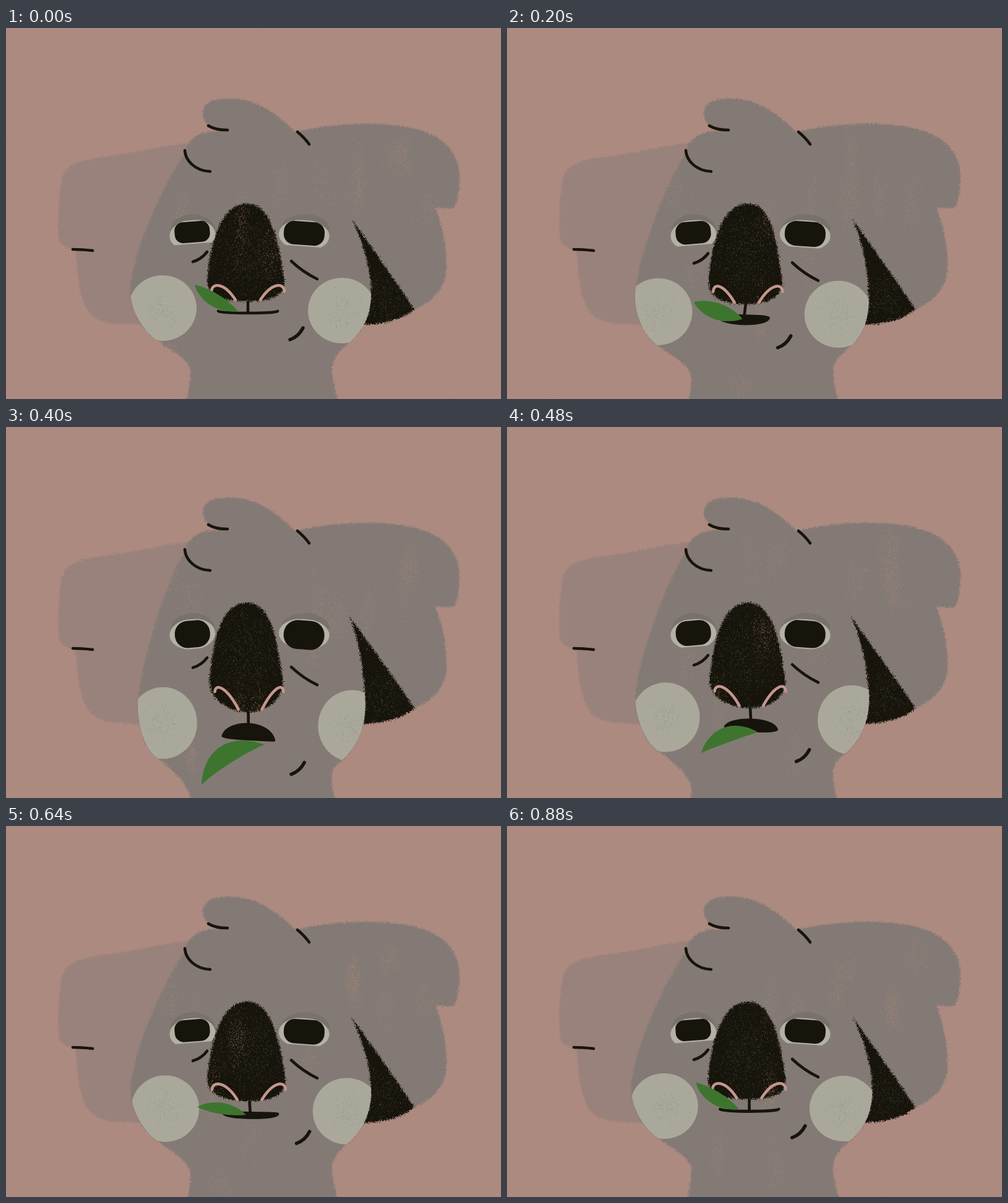
An HTML page with a canvas for the animation above (920 ms loop, 800 px wide and 600 px high).

```html
<!DOCTYPE html>
<html lang="en">
<head>
<meta charset="utf-8">
<title>Chewing koala</title>
<style>
html, body { margin: 0; width: 100%; height: 100%; overflow: hidden; background: #ad8a80; }
canvas { display: block; width: 800px; height: 600px; }
</style>
</head>
<body>
<canvas id="stage" width="800" height="600"></canvas>
<script>
const W = 800, H = 600, LOOP = 920, STEP = 40;
const ctx = document.getElementById('stage').getContext('2d', { willReadFrequently: true });

const COLOR = {
  back: '#ad8a80', farEar: '#99827b', fur: '#837a75', lid: '#79716c', ink: '#17140b',
  cheek: '#aaa89b', eye: '#b2b1a4', leaf: '#3d752f', pink: '#c4968d'
};

const progress = (t, from, to) => Math.min(1, Math.max(0, (t - from) / (to - from)));
const smooth = u => u * u * (3 - 2 * u);

// The jaw drops quickly and rises slowly.
const jawDrop = t => t < 320 ? smooth(progress(t, 160, 320)) : (1 - progress(t, 320, 800)) ** 2;

// The jaw swings far to the left, then a little to the right.
const jawSway = t => t < 390
  ? -29 * Math.sin(Math.PI * progress(t, 0, 390) ** 2)
  : 11 * Math.sin(Math.PI * progress(t, 390, LOOP) ** 0.7);

// The leaf bends while it is being lifted.
const leafCurl = t => 30 * smooth(progress(t, 320, 400)) * (1 - progress(t, 320, 880));

function random(seed) {
  return () => {
    seed = (seed + 0x6D2B79F5) | 0;
    let x = Math.imul(seed ^ (seed >>> 15), seed | 1);
    x ^= x + Math.imul(x ^ (x >>> 7), x | 61);
    return ((x ^ (x >>> 14)) >>> 0) / 4294967296;
  };
}

function fill(path, color) {
  ctx.fillStyle = color;
  ctx.fill(path);
}

function stroke(d, width = 4.6, color = COLOR.ink) {
  ctx.strokeStyle = color;
  ctx.lineWidth = width;
  ctx.lineCap = ctx.lineJoin = 'round';
  ctx.stroke(new Path2D(d));
}

function clipped(path, draw) {
  ctx.save();
  ctx.clip(path);
  draw();
  ctx.restore();
}

function ellipse(cx, cy, rx, ry, color, from = 0, to = 2 * Math.PI) {
  ctx.beginPath();
  ctx.ellipse(cx, cy, rx, ry, 0, from, to);
  ctx.fillStyle = color;
  ctx.fill();
}

const farEar = new Path2D('M300 186C270 186 225 199 175 206C120 213 94 218 89 250C84 285 84 310 85 338' +
  'C86 352 96 356 112 360C116 385 114 425 131 455C145 478 170 480 225 480L330 400Z');
const nearEar = new Path2D('M460 170C520 154 600 150 652 161C705 171 733 200 733 242C732 270 729 285 723 291' +
  'Q710 293 694 290C705 320 713 350 712 390C710 425 685 445 656 457L520 440Z');
const tuft = new Path2D('M328 158C312 145 314 117 346 115C400 108 436 138 466 166L494 197L400 250L320 200' +
  'L345 167Z');

function facePath(drop, sway) {
  const lx = 201 + 18 * drop - 0.15 * sway, rx = 590 - 14 * drop + 0.15 * sway;
  const wideY = 422 + 33 * drop - 0.2 * sway;
  const jawY = 506 + 43 * drop - 0.1 * sway, jawR = 558 - 16 * drop;
  const neckL = 557 + 65 * drop, neckR = 553 + 28 * drop;
  const [tx, ty] = shadeTip(drop);
  return new Path2D(`M345 167C312 164 291 182 288 205C262 240 ${lx + 6} ${wideY - 70} ${lx} ${wideY}
    C${lx - 1} ${wideY + 35} 223 ${jawY - 15} 245 ${jawY}
    C265 ${jawY + 15} 298 ${neckL - 22} 298 ${neckL}
    Q298 ${neckL + 15} 292 ${neckL + 45}V650H536V${neckR + 47}
    Q527 ${neckR + 15} 527 ${neckR}
    C527 ${neckR - 14} ${jawR - 25} ${jawY + 20} ${jawR} ${jawY}
    C${jawR + 18} ${jawY - 18} ${rx + 1} ${wideY + 45} ${rx} ${wideY}
    C${rx - 1} ${wideY - 35} ${tx + 18} ${ty + 38} ${tx} ${ty}
    C${tx - 15} ${ty - 50} 505 205 490 188L400 150Z`);
}

const shadeTip = drop => [559 - 7 * drop, 309 - 5 * drop];

function earShade(drop) {
  const [x, y] = shadeTip(drop);
  return new Path2D(`M${x} ${y}C600 368 636 418 660 455C640 472 610 479 577 480L550 470Z`);
}

function nosePath(drop, sway) {
  const l = 325 + 6 * drop, r = 450 - 4 * drop + 0.2 * sway, y = 408 + 3 * drop;
  const bx = 390 + 0.25 * sway, by = 442 + 28 * drop;
  return new Path2D(`M${l} ${y}C${l + 5} 350 346 284 390 284C430 284 ${r - 9} 350 ${r} ${y}
    C${r + 2} ${y + 30} ${bx + 30} ${by} ${bx} ${by}C${bx - 30} ${by} ${l - 2} ${y + 30} ${l} ${y}Z`);
}

// Chalky edges: every pixel is fetched from a slightly shifted place.
const shifts = (() => {
  const rnd = random(5), spread = () => Math.round((rnd() + rnd() + rnd() - 1.5) * 2.4);
  return Int32Array.from({ length: 99991 }, () => spread() + W * spread());
})();

function roughen(frame) {
  const image = ctx.getImageData(0, 0, W, H);
  const out = new Uint32Array(image.data.buffer), src = out.slice();
  let k = frame * 7919 % shifts.length;
  for (let i = 0; i < out.length; i++) {
    const j = i + shifts[k];
    if (j >= 0 && j < src.length) out[i] = src[j];
    if (++k === shifts.length) k = 0;
  }
  ctx.putImageData(image, 0, 0);
}

// Soft cloud of single grains.
function grains(rnd, count, cx, cy, sx, sy, color) {
  const bell = () => rnd() + rnd() + rnd() - 1.5;
  ctx.fillStyle = color;
  for (let i = 0; i < count; i++) {
    ctx.fillRect(Math.round(cx + bell() * sx), Math.round(cy + bell() * sy), 1, 1 + Math.round(rnd()));
  }
}

function texture(rnd, face, nose, shade) {
  const patches = (path, n, x, y, w, h) => clipped(path, () => {
    for (let i = 0; i < n; i++) {
      grains(rnd, 260, x + rnd() * w, y + rnd() * h, 10 + rnd() * 18, 30 + rnd() * 40,
        'rgba(178,141,118,.3)');
    }
  });
  patches(nearEar, 5, 520, 180, 160, 140);
  patches(face, 7, 260, 190, 260, 390);
  const dust = 'rgba(122,117,102,.24)';
  clipped(nose, () => grains(rnd, 1300, 388, 365, 65, 85, dust));
  clipped(shade, () => grains(rnd, 500, 612, 435, 45, 50, dust));
  ctx.fillStyle = 'rgba(70,50,45,.3)';
  for (let i = 0; i < 50; i++) ctx.fillRect(rnd() * W | 0, rnd() * H | 0, 1, 1);
}

function eye(cx, tilt, rx, w, h) {
  const cy = 331;
  ellipse(cx + 1, cy - 4, rx - 1, 26, COLOR.lid, Math.PI, 2 * Math.PI);
  ctx.save();
  ctx.translate(cx, cy);
  ctx.rotate(tilt);
  const opening = new Path2D();
  opening.rect(-50, -20, 100, h + 4);
  ctx.clip(opening);
  ellipse(0, 4, rx, 25, COLOR.eye);
  const pupil = new Path2D();
  pupil.roundRect(-w / 2, -18, w, h, Math.min(h / 2, h * 0.7 - 10));
  fill(pupil, COLOR.ink);
  ctx.restore();
}

function nostril(x, y, ex, ey) {
  const side = Math.sign(ex - x);
  const archY = y + (ey - y) * 0.55 - 22;
  stroke(`M${x} ${y}C${x + side} ${y - 15} ${ex - 18 * side} ${archY} ${ex} ${ey}`, 4.6, COLOR.pink);
}

function muzzle(drop, sway) {
  const shift = 0.2 * sway, outerY = 426 + 3 * drop, innerY = 440 + 24 * drop;
  nostril(332 + 8 * drop, outerY, 371 + shift + 6 * drop, innerY);
  nostril(450 + shift - 3 * drop, outerY, 411 + shift + 3 * drop, innerY);
  stroke(`M${391 + 0.25 * sway} ${443 + 27 * drop}L${391 + 0.35 * sway} ${460 + 30 * drop}`);
}

function mouth(drop, sway) {
  const cx = 391 + 0.4 * sway, half = 48 - 9 * drop - 0.3 * Math.abs(sway);
  const xl = cx - half, xr = cx + half, inset = half * 0.2;
  const yl = 458 + 60 * drop, yr = 458 + 70 * drop;
  const pull = y => y + (y - (yl + yr) / 2) / 3;
  const top = pull(461 + 29 * drop), bottom = pull(461 + 62 * drop + 0.35 * Math.abs(sway));
  const d = `M${xl} ${yl}C${xl + inset} ${top} ${xr - inset} ${top} ${xr} ${yr}
    C${xr - inset / 2} ${bottom} ${xl + inset} ${bottom} ${xl} ${yl}Z`;
  if (drop > 0.85) ellipse(xr - 9, yr + 8, 13, 9, COLOR.cheek);
  fill(new Path2D(d), COLOR.ink);
  stroke(d);
}

function leaf(drop, sway, curl) {
  const x = 305 + 15 * drop + 0.25 * sway, y = 415 + 180 * drop + 1.5 * curl;
  const dx = 375 + 35 * drop + 0.7 * curl - x, dy = 458 + 80 * drop - y;
  const length = Math.hypot(dx, dy);
  const upper = -(8 + 45 * drop + 0.3 * curl), lower = 20 - curl;
  // a point along the midrib, moved sideways from it
  const at = (u, off) => `${x + dx * u - dy / length * off} ${y + dy * u + dx / length * off}`;
  fill(new Path2D(`M${x} ${y}C${at(0.28, upper)} ${at(0.7, upper)} ${at(1, 0)}
    C${at(0.7, lower)} ${at(0.25, lower)} ${x} ${y}Z`), COLOR.leaf);
}

function cheek(cx, cy, drop, rnd) {
  const ry = 53 + 7 * drop;
  ellipse(cx, cy, 55, ry, COLOR.cheek);
  grains(rnd, 220, cx, cy, 32, ry * 0.6, 'rgba(125,122,108,.25)');
}

function draw(t) {
  const drop = jawDrop(t), sway = jawSway(t), tug = 16 * drop;
  const frame = t / STEP, rnd = random(frame * 101 + 17);
  const face = facePath(drop, sway), nose = nosePath(drop, sway), shade = earShade(drop);

  ctx.fillStyle = COLOR.back;
  ctx.fillRect(0, 0, W, H);
  fill(farEar, COLOR.farEar);
  fill(nearEar, COLOR.fur);
  fill(shade, COLOR.ink);
  fill(face, COLOR.fur);
  fill(tuft, COLOR.fur);
  fill(nose, COLOR.ink);
  roughen(frame);
  texture(rnd, face, nose, shade);

  clipped(face, () => {
    cheek(253 + 0.4 * sway, 453 + 37 * drop, drop, rnd);
    cheek(543 + 0.5 * sway + 22 * drop, 457 + 38 * drop, drop, rnd);
  });
  eye(301, -0.08, 37, 57, 34 + 0.88 * tug);
  eye(482, 0.07, 41, 66, 38 + 0.8 * tug);

  stroke('M327 158Q338 165 358 165');
  stroke('M289 198C290 214 305 231 330 232');
  stroke('M471 168Q482 177 490 188');
  stroke('M108 358Q122 358 140 360');
  stroke(`M302 ${378 + tug}Q316 ${374 + tug} 325 ${362 + tug}`);
  stroke(`M461 ${377 + tug}Q480 ${395 + tug} 503 ${406 + tug}`);
  const chinX = 459 + sway, chinY = 504 + 83 * drop;
  stroke(`M${chinX} ${chinY}Q${chinX + 14} ${chinY - 5} ${chinX + 21} ${chinY - 19}`, 5.5);

  muzzle(drop, sway);
  mouth(drop, sway);
  leaf(drop, sway, leafCurl(t));
}

let shown = -1;
function tick() {
  let t = Math.floor(performance.now() % LOOP / STEP) * STEP;
  if (t === 600 || t === 760) t -= STEP; // two poses are held twice as long
  if (t !== shown) draw(shown = t);
  requestAnimationFrame(tick);
}
tick();
</script>
</body>
</html>
```
